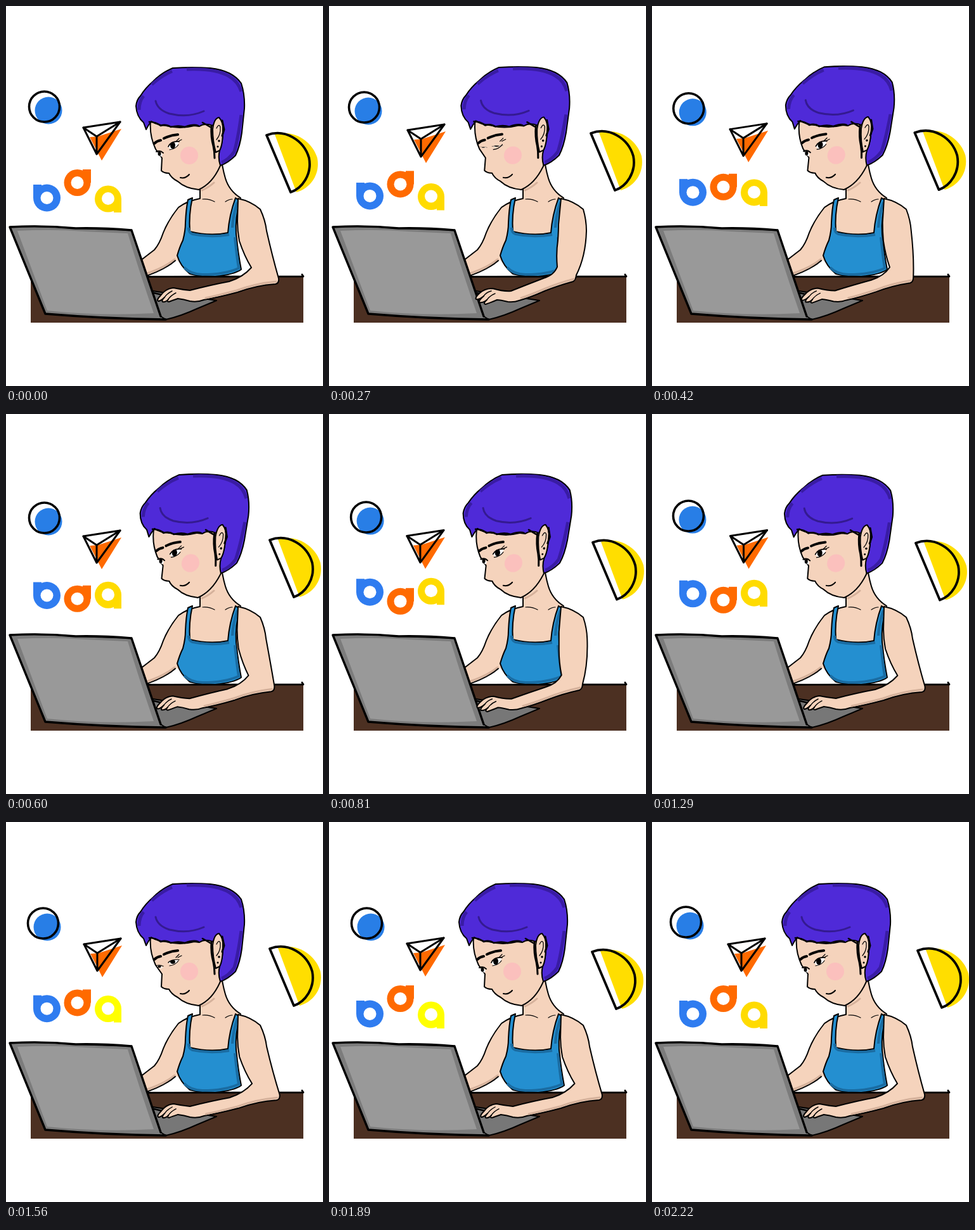
Animation of 500x600 px, one loop 2250 ms. Source, as an HTML page:

```html
<!DOCTYPE html>
<html lang="en">
<head>
<meta charset="utf-8">
<title>Working at a laptop</title>
<style>
html, body { margin: 0; width: 100%; height: 100%; overflow: hidden; background: #fff; }
svg { display: block; width: 500px; height: 600px; }
.line { fill: none; stroke: #000; stroke-linecap: round; stroke-linejoin: round; }
.ink { stroke: #000; stroke-width: 2; stroke-linecap: round; stroke-linejoin: round; }
.skin { fill: #f5d3bc; }
.shade { fill: none; stroke: #d5b19b; stroke-width: 3; stroke-linecap: round; }
</style>
</head>
<body>
<svg viewBox="0 0 500 600">
  <g id="ball">
    <circle cx="67" cy="165" r="21.5" fill="#287ee6"/>
    <circle class="line" cx="60.5" cy="159" r="24" stroke-width="3.6"/>
  </g>

  <g id="pyramid">
    <path fill="#ff6a00" d="M132 207 L145 206 L182 194 L151 244Z"/>
    <path class="line" stroke-width="3" style="fill:#fff" d="M122 192 L180 183 L143 206Z"/>
    <path class="line" stroke-width="3" d="M122 192 L143 234 L180 183 M143 206 V234"/>
  </g>

  <g id="dome">
    <path fill="#ffde00" d="M424 203 C453 194 483 213 491 240 C496 266 480 288 458 294Z"/>
    <path class="line" stroke-width="3.8" d="M411 204 C440 193 470 212 478 240 C483 266 467 288 449 294Z"/>
  </g>

  <g id="ringBlue" fill="#2f7cf0">
    <path d="M43 282 H56 V303 H43Z"/><circle cx="64.5" cy="303" r="21.5"/>
    <circle cx="64.5" cy="303" r="10" fill="#fff"/>
  </g>
  <g id="ringOrange" fill="#ff6a00">
    <path d="M121 258 H134 V279 H121Z"/><circle cx="112.5" cy="279" r="21"/>
    <circle cx="112.5" cy="279" r="10" fill="#fff"/>
  </g>
  <g id="ringYellow" fill="#ffdb00">
    <path d="M170 304 H182 V326 H170Z"/><circle cx="161" cy="304.5" r="21"/>
    <circle cx="161" cy="304" r="10" fill="#fff"/>
  </g>

  <path fill="#4c3022" d="M39 428 H469 V500 H39Z"/>
  <path class="line" stroke-width="2.8" d="M214 427.500 L469 427 L467 424"/>

  <path class="skin" d="M306 276 V304 Q285 308 272 318 Q256 338 248 358 Q242 376 234 385 L212 402 L216 428 Q250 417 267 402 L290 400 L365 390 L370 303 Q352 292 346 272 Q343 262 341 246Z"/>
  <path class="shade" d="M220 423 Q250 413 266 400 M309 291 Q319 287 328 279"/>
  <path class="line" stroke-width="2" d="M306 288 V304 Q285 308 272 318 Q256 338 248 358 Q242 376 234 385 L212 402 M216 428 Q250 417 267 402 M341 250 Q343 262 346 272 Q352 292 370 303"/>
  <path class="line" stroke="#4a3830" stroke-width="1.2" d="M310 305 Q320 304 329 309 M346 309 Q352 305 357 305"/>

  <path class="ink" fill="#248fd0" d="M287 306 L294 303 Q288 330 290 356 Q322 364 350 358 Q352 330 362 303 L369 308 Q361 335 363 360 Q366 390 371 416 Q360 424 330 427 Q305 427 290 423 Q275 411 270 394 Q274 380 279 370 Q283 355 283 342 Q284 320 287 306Z"/>
  <path fill="none" stroke="#1a6ca2" stroke-width="4" d="M288 350 Q288 358 294 360 Q322 366 352 361 M361 365 Q364 395 367 414 Q345 424 310 424 Q292 424 281 413 M365 310 Q358 330 357 350"/>

  <g id="head">
    <path class="skin ink" d="M228 182 Q226 205 236 226 L246 240 L245 260 Q249 264 257 264 Q261 272 271 277 Q283 288 304 290 Q326 280 338 252 L343 200 L330 175Z"/>
    <circle cx="289" cy="236" r="14" fill="#fbc0bd"/>
    <path class="line" stroke-width="2" d="M275 271 Q283 273 289 266"/>
    <path class="line" stroke-width="4" d="M234 217 Q238 213 244 212 M249 209 Q259 204 271 203"/>
    <g id="eyes">
      <path fill="#fff" d="M256 223 Q261 214 272 215 Q272 223 261 227Z M238 232 Q243 228 247 235 L245 238Z"/>
      <ellipse cx="263" cy="220" rx="4" ry="5.5"/>
      <ellipse cx="242" cy="233" rx="2.5" ry="3.5"/>
      <path class="line" stroke-width="1.8" d="M256 222 Q260 213 273 214 M237 230 Q243 227 248 232"/>
    </g>
    <path class="line" stroke-width="1.2" d="M268 214 L273 209 M271 214 L277 211 M258 227 Q267 226 272 219"/>

    <path class="ink" fill="#4f2ad8" d="M221 195 L217 184 Q206 175 205 158 Q206 148 212 142 Q220 129 232 119 Q246 105 263 98 Q294 96 322 98 Q340 100 352 106 Q364 112 371 122 Q377 140 376 162 L372 200 Q369 222 362 236 Q350 248 338 252 Q334 240 337 228 Q343 212 342 190 L336 177 L326 189 Q314 184 305 190 L297 189 Q274 195 253 189 Q238 188 229 182 Q224 189 221 195Z"/>
    <path fill="none" stroke="#391ca4" stroke-width="5" d="M210 164 Q210 150 217 142 M230 124 Q245 110 262 103 M285 100 Q330 98 352 111 Q366 119 371 135 M371 172 Q366 209 360 230 Q351 243 340 247"/>
    <path fill="none" stroke="#341a91" stroke-width="3" stroke-linecap="round" d="M236 150 Q239 164 258 170 Q287 177 312 166"/>
    <path class="line" stroke-width="2.6" d="M226 183 Q236 183 244 189 Q252 186 260 191 Q272 188 282 191 Q296 186 303 189 M310 184 L322 191"/>
    <path class="skin ink" d="M326 195 Q328 177 336 176 Q343 184 342 195 Q342 219 337 228 L331 231 Q326 214 326 195Z"/>
    <path class="line" stroke-width="1.3" d="M332 193 Q336 185 338 191 Q339 203 332 211"/>
    <path class="line" stroke-width="3" d="M341 181 L344 195 L341 205 M324 190 Q323 207 327 221 Q329 230 329 240"/>
    <circle cx="336" cy="213" r="1.8"/><circle cx="334" cy="222" r="1.5"/>
  </g>

  <path class="ink" fill="#777" d="M225 449 Q280 457 332 465 L301 478 Q275 490 252 495 L238 490Z"/>
  <path class="line" stroke-width="2.4" d="M233 453 L250 457"/>
  <path class="ink" fill="#7c7c7c" d="M6 349 Q58 346 110 351 L198 354 L244 490 L252 495 Q158 494 62 486Z"/>
  <path fill="#999" d="M18 355 Q75 352 125 356 L192 359 Q212 425 233 485 Q150 490 65 481Z"/>
  <path class="line" stroke-width="3.4" d="M198 354 Q150 350 110 351 Q58 346 6 349 L62 486 Q158 494 252 495 M198 354 L244 490"/>

  <path id="arm" class="skin ink"/>
  <path id="armShade" class="shade"/>
  <path id="knuckles" class="line" stroke-width="1.4"/>
</svg>
<script>
const LOOP = 2250, STEP = 30;
const TIMES = [0, 270, 600, 1050, 1560, 1890, 2220];
const $ = id => document.getElementById(id);
const clamp = v => Math.max(0, Math.min(1, v));
const ease = v => (1 - Math.cos(Math.PI * clamp(v))) / 2;
const swing = (t, a, b, c, d) => ease((t - a) / (b - a)) - ease((t - c) / (d - c));

function track(times, values, t) {
  let i = 0;
  while (i < times.length - 2 && t > times[i + 1]) i++;
  const p = clamp((t - times[i]) / (times[i + 1] - times[i]));
  return values[i] + (values[i + 1] - values[i]) * p;
}

// Blends two paths that share the same commands.
function morph([from, to], p) {
  const ends = to.match(/\d+/g);
  let i = 0;
  return from.replace(/\d+/g, n => (+n + (ends[i++] - n) * p).toFixed(2));
}

// Resting arm and the arm pulled in to type.
const ARM = [
  "M366 304 Q386 308 401 321 Q409 338 411 355 Q420 395 430 430 Q431 438 425 439 Q395 441 365 452 Q335 460 312 464 Q302 468 290 466 Q280 463 271 462 Q262 465 257 467 Q253 467 256 463 Q252 468 247 467 Q245 465 250 460 Q244 466 240 466 Q237 464 244 457 Q252 446 264 445 Q278 448 290 449 Q325 440 352 435 Q374 428 387 413 Q376 395 368 371 Q365 355 365 340Z",
  "M366 304 Q386 308 401 321 Q406 338 406 355 Q405 395 390 425 Q389 433 385 435 Q360 442 340 450 Q318 460 300 465 Q292 468 282 467 Q270 464 265 464 Q256 468 247 471 Q242 470 249 464 Q243 469 237 468 Q236 465 244 458 Q237 464 232 463 Q230 460 238 453 Q246 446 258 446 Q275 451 287 450 Q312 440 338 430 Q355 425 360 412 Q358 390 361 370 Q362 355 362 345Z"
];
const ARM_SHADE = [
  "M426 435 Q394 438 364 449 Q334 457 315 461",
  "M386 431 Q360 438 339 447 Q318 456 303 461"
];
const KNUCKLES = [
  "M256 463 Q260 457 268 453 M250 460 Q254 454 262 450",
  "M249 464 Q254 457 262 454 M244 458 Q248 452 256 450"
];

const FLOAT = {
  ball: [[0, -5, 0, -4, -2, -1, -7], [0, 1, 5, 3, 1, 1, -1]],
  pyramid: [[0, 2, 0, 2, 1, 1, -2], [0, 4, 1, 0, 1, 0, 1]],
  dome: [[0, 2, 5, 5, 5, 4, 8], [0, -3, -5, 3, -4, 1, -1]]
};
const BOUNCE = { ringBlue: -22, ringOrange: 17, ringYellow: -25 };

function place(id, x, y) {
  $(id).setAttribute("transform", `translate(${x.toFixed(2)} ${y.toFixed(2)})`);
}

function draw(t) {
  for (const id in FLOAT) place(id, ...FLOAT[id].map(v => track(TIMES, v, t)));

  const hop = swing(t, 79, 860, 1109, 1890);
  for (const id in BOUNCE) place(id, 0, BOUNCE[id] * hop);
  $("ringYellow").setAttribute("fill", t >= 1320 && t < 2100 ? "#ffff00" : "#ffdb00");

  const lean = swing(t, 0, 540, 1080, 1560);
  const k = 0.06 * lean, s = 1 + 0.011 * lean;
  $("head").setAttribute("transform", `matrix(1 0 ${-k} ${s} ${k * 268} ${290 * (1 - s)})`);

  const blink = Math.max(0, ...[270, 1500].map(c => 1 - Math.abs(t - c) / 120));
  const open = 1 - 0.85 * blink;
  $("eyes").setAttribute("transform", `matrix(1 0 0 ${open} 0 ${222 * (1 - open)})`);

  const reach = track([0, 270, 540, 900, 1170, 1560, 2160], [0, 1, 0, 1, 0, -0.04, 0], t);
  $("arm").setAttribute("d", morph(ARM, reach));
  $("armShade").setAttribute("d", morph(ARM_SHADE, reach));
  $("knuckles").setAttribute("d", morph(KNUCKLES, reach));
}

const start = performance.now();
function tick() {
  const t = (performance.now() - start) % LOOP;
  draw(Math.floor(t / STEP) * STEP);
  requestAnimationFrame(tick);
}
tick();
</script>
</body>
</html>
```
